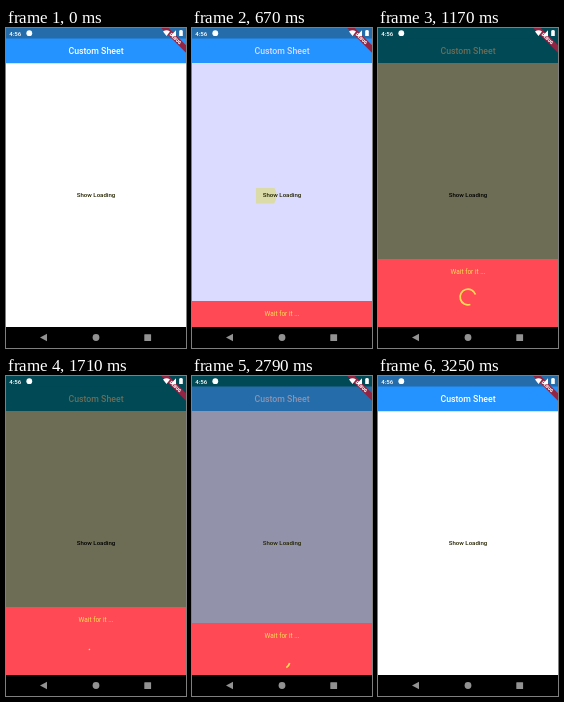
Recreate the animation shown at these times as an HTML page. Size 180 by 320 pixels, loop 3.29 s.

```html
<!DOCTYPE html>
<html lang="en">
<head>
<meta charset="utf-8">
<title>Custom Sheet</title>
<style>
  html, body { margin: 0; width: 100%; height: 100%; overflow: hidden; background: #000; }
  svg { display: block; width: 100%; height: 100%; font-family: Roboto, sans-serif; }
  text { text-anchor: middle; }
</style>
</head>
<body>
<svg viewBox="0 0 180 320">
  <clipPath id="button"><rect x="64" y="160" width="53" height="15.5"/></clipPath>
  <rect id="page" width="180" height="299"/>
  <rect id="shadow" y="35" width="180" height="1"/>
  <rect id="bar" width="180" height="35"/>
  <rect id="status" width="180" height="10.5"/>
  <text id="title" x="90" y="26.1" font-size="8.75" font-weight="500">Custom Sheet</text>
  <g clip-path="url(#button)"><circle id="splash" cx="70" cy="167.5"/></g>
  <text id="label" x="90" y="169.2" font-size="6.125" font-weight="500">Show Loading</text>

  <g id="sheet">
    <rect width="180" height="70" fill="#ff4955"/>
    <text x="90" y="15.4" font-size="6.5" fill="#ffdb55">Wait for it ...</text>
    <circle id="spinner" cx="90" cy="38" r="7.9" pathLength="360" fill="none" stroke="#ffdb55" stroke-width="1.75"/>
  </g>

  <g transform="translate(180 0) rotate(45)">
    <rect x="-17.5" y="12.25" width="35" height="5.25" fill="#922444"/>
    <text y="16.5" font-size="4.46" font-weight="900" fill="#fff">DEBUG</text>
  </g>

  <g fill="#fff">
    <text x="9.3" y="7.5" font-size="6.1" font-weight="500">4:56</text>
    <circle cx="23.3" cy="5.2" r="2.9"/>
    <path d="M157 3.6Q160.5 1 164 3.6L160.5 8ZM170 2.2V8H164.6Z"/>
    <path d="M173.2 2.6H174.2V2H175.8V2.6H176.8V8H173.2Z"/>
  </g>

  <rect y="299" width="180" height="21"/>
  <g fill="#929292">
    <path d="M34 309.5L41 305.8V313.2Z"/>
    <circle cx="90" cy="309.5" r="3.4"/>
    <rect x="138.3" y="306.2" width="6.8" height="6.8" rx=".5"/>
  </g>
</svg>
<script>
const LOOP = 3290, OPEN = 632, OPEN_TIME = 290, CLOSE = 2655, CLOSE_TIME = 232;
const SHEET = 68, BOTTOM = 299, SPIN = 1025;
const el = id => document.getElementById(id);
const clamp = v => Math.min(1, Math.max(0, v));

function bezier(x1, y1, x2, y2) {
  const at = (a, b, s) => 3 * a * s * (1 - s) ** 2 + 3 * b * s * s * (1 - s) + s ** 3;
  return x => {
    x = clamp(x);
    if (x === 0 || x === 1) return x;
    let lo = 0, hi = 1;
    for (let i = 0; i < 24; i++) {
      const mid = (lo + hi) / 2;
      if (at(x1, x2, mid) < x) lo = mid; else hi = mid;
    }
    return at(y1, y2, lo);
  };
}
const decelerate = bezier(0, 0, .2, 1);
const ease = bezier(.25, .1, .25, 1);
const fastOutSlowIn = bezier(.4, 0, .2, 1);

// Colours step through a palette of 8 reds, 8 greens and 4 blues.
function shade(rgb, light) {
  const levels = [7, 7, 3];
  return `rgb(${rgb.map((v, i) => Math.round(Math.round(v * light / 255 * levels[i]) * 255 / levels[i]))})`;
}
const colors = {
  page: [255, 255, 255], shadow: [232, 232, 240], bar: [33, 150, 243],
  status: [26, 120, 194], title: [255, 255, 255], label: [33, 33, 33]
};

function drawSpinner(time) {
  const turns = Math.max(0, time) / SPIN, phase = turns % 1, step = Math.floor(turns);
  const head = 270 * fastOutSlowIn(phase * 2);
  const tail = 270 * fastOutSlowIn(phase * 2 - 1);
  const sweep = Math.max(head - tail, 1);
  el('spinner').setAttribute('stroke-dasharray', `${sweep} ${360 - sweep}`);
  el('spinner').setAttribute('transform', `rotate(${-90 + tail + phase * 306 - step * 144} 90 38)`);
}

function draw(t) {
  const open = t < CLOSE ? clamp((t - OPEN) / OPEN_TIME) : clamp(1 - (t - CLOSE) / CLOSE_TIME);
  const light = 1 - .54 * ease(open);
  for (const id in colors) el(id).setAttribute('fill', shade(colors[id], light));

  const grey = 255 - 30 * clamp((740 - t) / 70);
  el('splash').setAttribute('r', t < 740 ? Math.max(0, (t - 590) * .18) : 0);
  el('splash').setAttribute('fill', shade([grey, grey, grey], light));

  el('sheet').setAttribute('transform', `translate(0 ${Math.round(BOTTOM - SHEET * decelerate(open))})`);
  drawSpinner(t - OPEN);
}

const start = performance.now();
function tick() {
  draw((performance.now() - start) % LOOP);
  requestAnimationFrame(tick);
}
tick();
</script>
</body>
</html>
```
